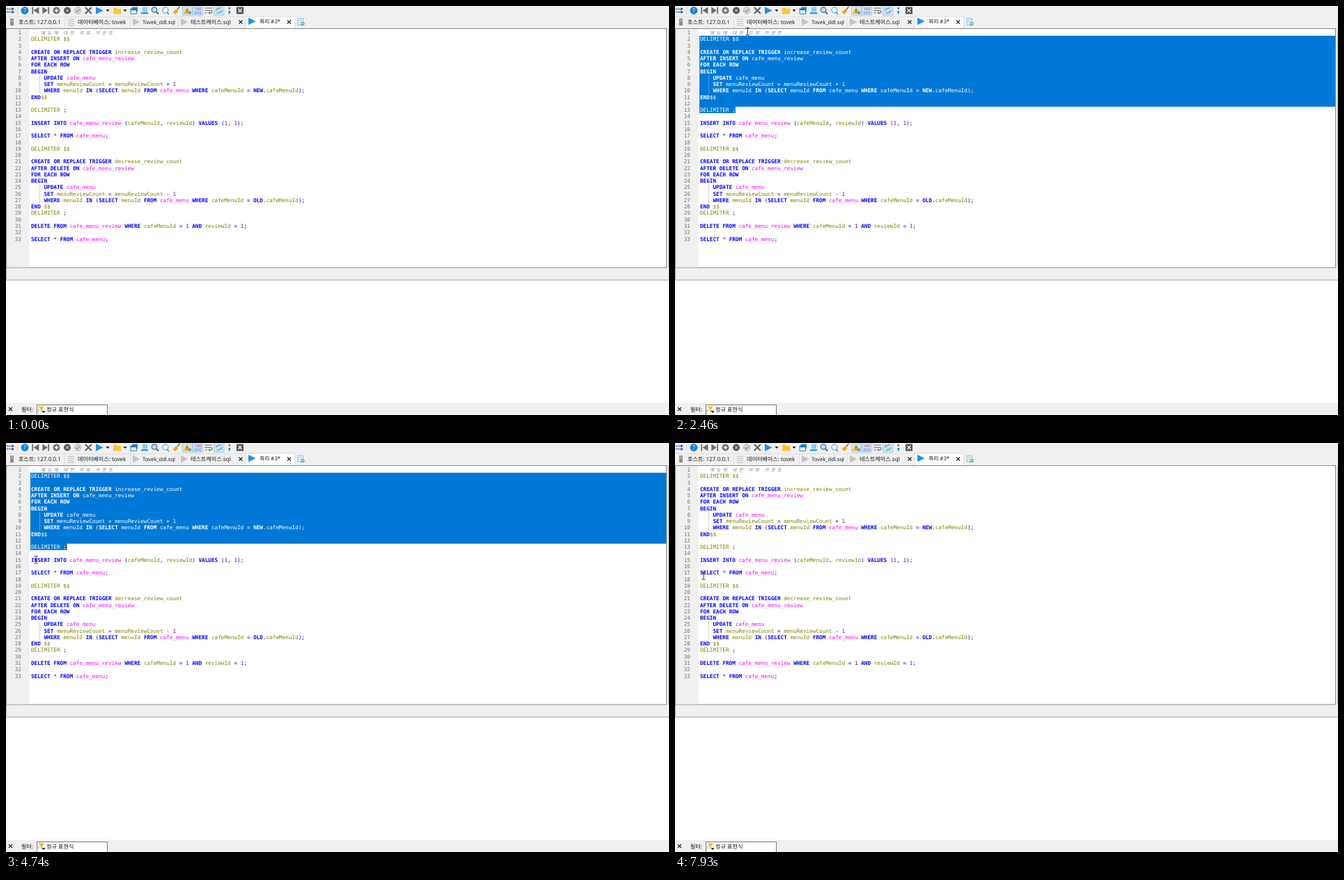
Recreate the animation shown at these times as an HTML page. Size 952 by 588 pixels, loop 7990 ms.

```html
<!DOCTYPE html>
<html lang="ko">
<head>
<meta charset="utf-8">
<title>Query editor</title>
<style>
  html, body { margin: 0; width: 100%; height: 100%; overflow: hidden; background: #fff; }
  svg { display: block; width: 952px; height: 588px; text-rendering: geometricPrecision; }
  .ui { font: 8.1px "Open Sans", "Noto Sans CJK KR", "Noto Sans CJK JP", sans-serif; fill: #111; }
  .menu { font-size: 8.4px; }
  .code { font: 7.68px "DejaVu Sans Mono", monospace; }
  .kw { font-weight: bold; fill: #00f; }
  .id { fill: #808000; }
  .tbl { fill: #f0f; }
  .num { fill: #800080; }
  .sym { fill: #00f; }
  .note { font: italic 6.6px "Noto Sans CJK KR", "Noto Sans CJK JP", sans-serif; fill: #808080; }
  .line { fill: #707070; text-anchor: end; }
  .guide { stroke: #c4c4c4; stroke-width: .7; }
  #picked text { fill: #fff; }
  #picked .guide { stroke: #6fb0e8; }
</style>
</head>
<body>
<svg viewBox="0 0 952 588">
  <defs>
    <clipPath id="range"><path id="rangePath"/></clipPath>
    <path id="play" d="M-5-5.2 5.5 0-5 5.2Z"/>
    <path id="down" d="M-2.5-1.3h5L0 1.6Z"/>
    <path id="cross" d="M-2.5-2.5 2.5 2.5M2.5-2.5-2.5 2.5" fill="none" stroke-width="1.2"/>
  </defs>

  <rect width="952" height="588" fill="#fff"/>
  <rect width="952" height="32" fill="#f0f0f0"/>
  <rect y="376" width="952" height="18" fill="#f0f0f0"/>
  <rect x="948" y="32" width="4" height="344" fill="#f0f0f0"/>
  <rect y="570.5" width="952" height="18" fill="#f0f0f0"/>
  <path d="M0 394H952" stroke="#a0a0a0"/>
  <path d="M.5 376V394M951.5 32V376" stroke="#b4b4b4"/>

  <!-- toolbar -->
  <g id="tools">
    <rect id="runHot" x="127" y="0" width="24" height="13.5" fill="#c4e0f5"/>
    <g fill="#cce4f7" stroke="#8fc3ec" stroke-width=".7">
      <rect x="253.4" y="-1" width="14.4" height="14.2"/>
      <rect x="268.4" y="-1" width="14.4" height="14.2"/>
      <rect x="298.6" y="-1" width="14.4" height="14.2"/>
    </g>
    <path d="M1 4.3H10M1 8.7H10" stroke="#2454a4" stroke-width="1.3" stroke-dasharray="2.5 .7"/>
    <path d="M8.5 2 12 4.3 8.5 6.6ZM8.5 6.4 12 8.7 8.5 11Z" fill="#2454a4"/>
    <path d="M16.5 1V12" stroke="#d4d4d4"/>
    <circle cx="27" cy="6.5" r="5.4" fill="#1784d8"/>
    <text class="ui" x="27" y="9.4" text-anchor="middle" font-weight="bold" style="fill:#fff">?</text>
    <path d="M37.3 1.5h1.8v10h-1.8ZM47.3 1.5v10L39.5 6.5ZM60.3 1.5h1.8v10h-1.8ZM52.3 1.5v10L60 6.5Z" fill="#6c6c6c"/>
    <circle cx="72.5" cy="6.5" r="5" fill="#707070"/>
    <path d="M69.8 6.5h5.4M72.5 3.8v5.4" stroke="#fff" stroke-width="1.3"/>
    <circle cx="88" cy="6.5" r="5" fill="#555"/>
    <use href="#cross" transform="translate(88 6.5) scale(.8)" stroke="#fff"/>
    <circle cx="103" cy="6.5" r="4.8" fill="#d8d8d8" stroke="#b4b4b4"/>
    <path d="M100.5 6.5 102.5 8.5 106 4.4" fill="none" stroke="#8c8c8c" stroke-width="1.2"/>
    <use href="#cross" transform="translate(118.3 6.5) scale(1.8)" stroke="#606060" stroke-width="1"/>
    <use href="#play" x="134" y="6.5" fill="#1e90f0"/>
    <use href="#down" x="146" y="6.5"/>
    <path d="M154 2.5h4.5l1.3 1.5h5.4v7.5H154Z" fill="#ffc52a"/>
    <use href="#down" x="171" y="6.5"/>
    <path d="M181 1.5h8v7h-8Z" fill="#2b8fd8"/>
    <path d="M179 4h8.5v7.5H179Z" fill="#d9ecfa" stroke="#1c6fb2" stroke-width=".8"/>
    <path d="M179 4h8.5v2.2H179Z" fill="#1c6fb2"/>
    <path d="M196 1.5h7v7h-7Z" fill="#8ecbf5"/>
    <path d="M194 9h10v2.5H194Z" fill="#3d9de0"/>
    <circle cx="213" cy="5.5" r="3.7" fill="#bfe0f7" stroke="#3c70a0" stroke-width="1.3"/>
    <path d="M215.8 8.3 219 11.7" stroke="#3c5b78" stroke-width="1.8"/>
    <circle cx="229" cy="6" r="4" fill="#f4faff" stroke="#4da3dc" stroke-width="1.2"/>
    <path d="M231 9 234 12" stroke="#3c80b8" stroke-width="1.4"/>
    <path d="M249.5 1 245.5 5.5" stroke="#8a5a28" stroke-width="1.4"/>
    <path d="M244 4.5 247.3 7.5 243 12 239.5 9Z" fill="#f2a51c"/>
    <path d="M260 1.5 265.3 11H255Z" fill="#f6b61c"/>
    <path d="M260 4.8V8M260 9v1" stroke="#553a00"/>
    <circle cx="264" cy="9.7" r="2.1" fill="#8a8a8a"/>
    <g class="ui" text-anchor="middle" font-weight="bold">
      <text x="275.6" y="6" style="font-size:5.8px;fill:#c0355f">160</text>
      <text x="275.6" y="12" style="font-size:5.8px;fill:#345bb5">010</text>
    </g>
    <path d="M285.5 3H296M285.5 6.5H294q2 0 2 1.8T294 10H291M285.5 10h3.2" fill="none" stroke="#666" stroke-width="1.2"/>
    <path d="M293 8 290.5 10 293 12Z" fill="#666"/>
    <path d="M301.5 7q1-4 5-3.5l2-1.5M310 6q-1 4-5 3.5l-2 1.5" fill="none" stroke="#73a891" stroke-width="1.4"/>
    <path d="M319.5 2h2.6v2.6h-2.6ZM319.5 7h2.6v2.6l-1.5 2.2h-1.1l.8-2.2h-.8Z" fill="#1784d8"/>
    <rect x="331" y="1.5" width="10" height="10" fill="#555"/>
    <use href="#cross" x="336" y="6.5" stroke="#fff"/>
  </g>

  <!-- tabs -->
  <rect id="tabHot" x="85" y="16" width="92" height="16" fill="#d8ebf9"/>
  <path d="M344 32V15H415V32" fill="#fff" stroke="#d9d9d9"/>
  <path d="M0 15.5H343.5M84.5 16V31M178.5 16V31M247.5 16V31" stroke="#e0e0e0"/>
  <rect x="6" y="18" width="5" height="10" fill="#8c8c8c"/>
  <path d="M7 20H10M7 22H10" stroke="#d8d8d8" stroke-width=".8"/>
  <path d="M88.5 19.2H98M88.5 22.2H98M88.5 25.2H98M88.5 28H98" stroke="#ccc" stroke-width="1.5"/>
  <use href="#play" x="187" y="23" fill="#c4c4c4"/>
  <use href="#play" x="256" y="23" fill="#c4c4c4"/>
  <use href="#play" x="353" y="22" fill="#1e90f0"/>
  <use href="#cross" x="337" y="23" stroke="#222"/>
  <use href="#cross" x="406.5" y="23" stroke="#222"/>
  <path d="M419 18h7.5v9H419Z" fill="#eef7fd" stroke="#7db5dc" stroke-width=".9"/>
  <path d="M420.5 20.5H425M420.5 23H424" stroke="#7db5dc" stroke-width=".8"/>
  <circle cx="426" cy="25.5" r="2.6" fill="#45b06b"/>
  <path d="M424.5 25.5h3M426 24v3" stroke="#fff" stroke-width=".8"/>
  <g class="ui">
    <text x="18" y="26">호스트: 127.0.0.1</text>
    <text x="103" y="26">데이터베이스: tovek</text>
    <text x="196" y="26" style="font-size:7.6px">Tovek_ddl.sql</text>
    <text x="265" y="26">테스트케이스.sql</text>
    <text x="364" y="25" style="font-size:7.8px">쿼리 #3*</text>
  </g>

  <!-- editor -->
  <rect x=".5" y="32.5" width="948" height="343.5" fill="#fff" stroke="#868686"/>
  <rect x="1" y="33" width="32.5" height="342.5" fill="#f0f0f0"/>
  <g id="lines" class="code"></g>
  <g id="plain" class="code"></g>
  <g clip-path="url(#range)">
    <rect x="35" y="33" width="913" height="343" fill="#0078d7"/>
    <g id="picked" class="code"></g>
  </g>
  <rect id="caret" width="1.1" height="9"/>

  <!-- filter bar -->
  <use href="#cross" x="6.5" y="579.5" stroke="#222"/>
  <text class="ui" x="22" y="583">필터:</text>
  <rect x="44.5" y="573.5" width="101" height="16" fill="#fff" stroke="#7a7a7a"/>
  <path d="M46.5 575.5H55L51.8 580v4l-2-1v-3Z" fill="#f0bb35"/>
  <text class="ui" x="45.5" y="583.5" style="font-size:7px;fill:#2a7fc4" font-weight="bold">r</text>
  <use href="#down" x="54" y="583.5"/>
  <text class="ui" x="58" y="583">정규 표현식</text>

  <!-- run menu -->
  <g id="menu">
    <rect x="129" y="17" width="167" height="80" fill="#000" opacity=".18"/>
    <rect x="127" y="14.8" width="166.5" height="79.4" fill="#f2f2f2" stroke="#8e8e8e" stroke-width=".9"/>
    <rect id="menuHot" x="129" y="30.2" width="163" height="14.4" fill="#91c9f7"/>
    <path d="M148 61H291" stroke="#c8c8c8"/>
    <rect x="130" y="64" width="12.5" height="12.5" fill="#91c9f7"/>
    <path d="M133.3 70 135.4 72.2 139.3 67.9" fill="none" stroke="#1d3f66" stroke-width="1.2"/>
    <use href="#play" x="135.5" y="22.5" fill="#1e90f0"/>
    <use href="#play" x="135.8" y="37.3" fill="#1e90f0"/>
    <use href="#play" x="135.8" y="52" fill="#1e90f0"/>
    <path d="M130.5 34h4M130.5 36.2h5M130.5 38.4h5M130.5 40.6h4" stroke="#4f6b86"/>
    <path d="M130.5 47.5h3v9h-3Z" fill="#a8a8a8"/>
    <g id="items" class="ui menu"></g>
  </g>

  <circle id="press" r="9" fill="#f2e81e" opacity=".62"/>
  <path id="beam" d="M-2.6-5.2H-.6L0-4.6.6-5.2H2.6M0-4.6V4.6M-2.6 5.2H-.6L0 4.6.6 5.2H2.6" fill="none" stroke="#222" stroke-width=".9"/>
  <path id="arrow" d="M0 0V9.6L2.2 7.6 3.8 11.2 5.4 10.5 3.8 7H6.8Z" fill="#fff" stroke="#111" stroke-width=".8"/>
</svg>
<script>
const LOOP = 7990, STEP = 1000 / 15;
const LEFT = 36, ADV = 4.625, ROW = 9.266;
const $ = id => document.getElementById(id);

const source = `-- 메뉴에 대한 리뷰 카운트
DELIMITER $$

CREATE OR REPLACE TRIGGER increase_review_count
AFTER INSERT ON cafe_menu_review
FOR EACH ROW
BEGIN
    UPDATE cafe_menu
    SET menuReviewCount = menuReviewCount + 1
    WHERE menuId IN (SELECT menuId FROM cafe_menu WHERE cafeMenuId = NEW.cafeMenuId);
END$$

DELIMITER ;

INSERT INTO cafe_menu_review (cafeMenuId, reviewId) VALUES (1, 1);

SELECT * FROM cafe_menu;

DELIMITER $$

CREATE OR REPLACE TRIGGER decrease_review_count
AFTER DELETE ON cafe_menu_review
FOR EACH ROW
BEGIN
    UPDATE cafe_menu
    SET menuReviewCount = menuReviewCount - 1
    WHERE menuId IN (SELECT menuId FROM cafe_menu WHERE cafeMenuId = OLD.cafeMenuId);
END $$
DELIMITER ;

DELETE FROM cafe_menu_review WHERE cafeMenuId = 1 AND reviewId = 1;

SELECT * FROM cafe_menu;`.split("\n");

const rowTop = n => 33.6 + ROW * (n - 1);
const baseline = n => 41 + ROW * (n - 1);

function add(parent, tag, attrs, text = "") {
  const node = document.createElementNS("http://www.w3.org/2000/svg", tag);
  for (const key in attrs) node.setAttribute(key, attrs[key]);
  node.textContent = text;
  parent.append(node);
}

function kind(word) {
  if (/^cafe_menu/.test(word)) return "tbl";
  if (/^\d/.test(word)) return "num";
  if (word === "DELIMITER" || word === "$$") return "id";
  if (/^[A-Z]+$/.test(word)) return "kw";
  return /^\w/.test(word) ? "id" : "sym";
}

function addNote(parent, line, y) {
  let x = LEFT;
  const xs = [...line].map(ch => {
    const at = x;
    x += ch > "\u1000" ? ADV * 2 : ADV;
    return at.toFixed(2);
  });
  add(parent, "text", { class: "note", x: xs.join(" "), y }, line);
}

function addCode(parent) {
  source.forEach((line, i) => {
    const n = i + 1, y = baseline(n);
    if (line.startsWith("--")) return addNote(parent, line, y);
    if (line.startsWith(" "))
      add(parent, "path", { class: "guide", d: `M48.5 ${rowTop(n)}v${ROW}` });
    for (const m of line.matchAll(/\w+|\$\$|[^\s\w]/g))
      add(parent, "text", { class: kind(m[0]), x: LEFT + m.index * ADV, y }, m[0]);
  });
}

addCode($("plain"));
addCode($("picked"));
source.forEach((_, i) => add($("lines"), "text", { class: "line", x: 22, y: baseline(i + 1) }, i + 1));

[["실행(V)", 25.5, "F9"], ["선택 실행(W)", 40.2, "Ctrl+F9"], ["현재 쿼리 실행(X)", 55, "Shift+Ctrl+F9"],
 ["차례대로 쿼리 보내기(Y)", 73.2], ["일괄 보내기(Z)", 88]].forEach(([label, y, keys]) => {
  add($("items"), "text", { x: 149, y }, label);
  if (keys) add($("items"), "text", { x: 278, y, "text-anchor": "end" }, keys);
});

// time, x, y of the pointer
const path = [
  [130, 838, 530], [870, 40, 50], [930, 40, 50], [1200, 50, 66], [1530, 80, 98], [1660, 86, 134],
  [1860, 88, 149], [2140, 88, 149], [2460, 106, 25], [2660, 114, 17], [2740, 114, 17],
  [3060, 146, 9], [3200, 146, 9], [3530, 157, 37], [3670, 157, 37], [4400, 70, 182],
  [4740, 43, 168], [4930, 43, 168], [5670, 146, 10], [5930, 146, 9], [6000, 146, 9],
  [6400, 158, 50], [6600, 158, 50], [7390, 60, 183], [7790, 41, 189], [7870, 41, 189], [7930, 41, 191]
];
const presses = [[930, 1860], [3200, 3330], [3670, 3800], [4930, 5060], [5860, 6000], [6600, 6730]];
const menus = [[3260, 3740], [6000, 6670]];
const carets = [[930, 2200], [2800, 4200], [4660, 5460], [6670, 7130], [7530, 7790]];
const selecting = [[930, 4930]];

const within = (spans, t) => spans.some(([a, b]) => t >= a - 5 && t < b - 5);
const show = (id, on) => $(id).setAttribute("visibility", on ? "visible" : "hidden");
const ease = u => u * u * (3 - 2 * u);

function pointer(t) {
  const i = path.findIndex(p => p[0] > t);
  if (i < 0) return path.at(-1).slice(1);
  if (i === 0) return path[0].slice(1);
  const [t0, x0, y0] = path[i - 1], [t1, x1, y1] = path[i];
  const u = ease((t - t0) / (t1 - t0));
  return [x0 + (x1 - x0) * u, y0 + (y1 - y0) * u];
}

function caretAt(t) {
  const [x, y] = pointer(t);
  const line = Math.floor((y - 33.6) / ROW) + 1;
  const col = Math.min(source[line - 1].length, Math.max(0, Math.round((x - LEFT) / ADV)));
  return [line, LEFT + col * ADV];
}

function draw(time) {
  const t = Math.floor((time + 4) / STEP) * STEP;
  const [x, y] = pointer(t);
  const open = within(menus, t), picked = within(selecting, t);
  const inCode = !open && x > 34 && x < 948 && y > 33 && y < 376;
  const visible = t >= 130;

  for (const id of ["press", "beam", "arrow"]) $(id).setAttribute("transform", `translate(${x} ${y})`);
  show("press", within(presses, t));
  show("beam", visible && inCode);
  show("arrow", visible && !inCode);
  show("tabHot", !open && y > 15 && y < 32 && x > 85 && x < 177);
  show("runHot", open || (y < 14 && x > 126 && x < 152));

  show("menu", open);
  const item = [22.5, 37.3, 52].find(c => Math.abs(y - c) < 7.4);
  show("menuHot", open && item);
  if (item) $("menuHot").setAttribute("y", item - 7.2);

  const [line, cx] = caretAt(t < 4925 ? Math.min(Math.max(t, 930), 1860) : 4930);
  const top = rowTop(line);
  $("rangePath").setAttribute("d", picked
    ? `M35 ${rowTop(2)}H948V${top}H${cx}V${top + ROW}H35Z` : "");
  $("caret").setAttribute("x", cx - .4);
  $("caret").setAttribute("y", top);
  $("caret").setAttribute("fill", picked ? "#6b3a14" : "#222");
  show("caret", within(carets, t));
}

const start = performance.now();
function tick() {
  draw((performance.now() - start) % LOOP);
  requestAnimationFrame(tick);
}
tick();
</script>
</body>
</html>
```
